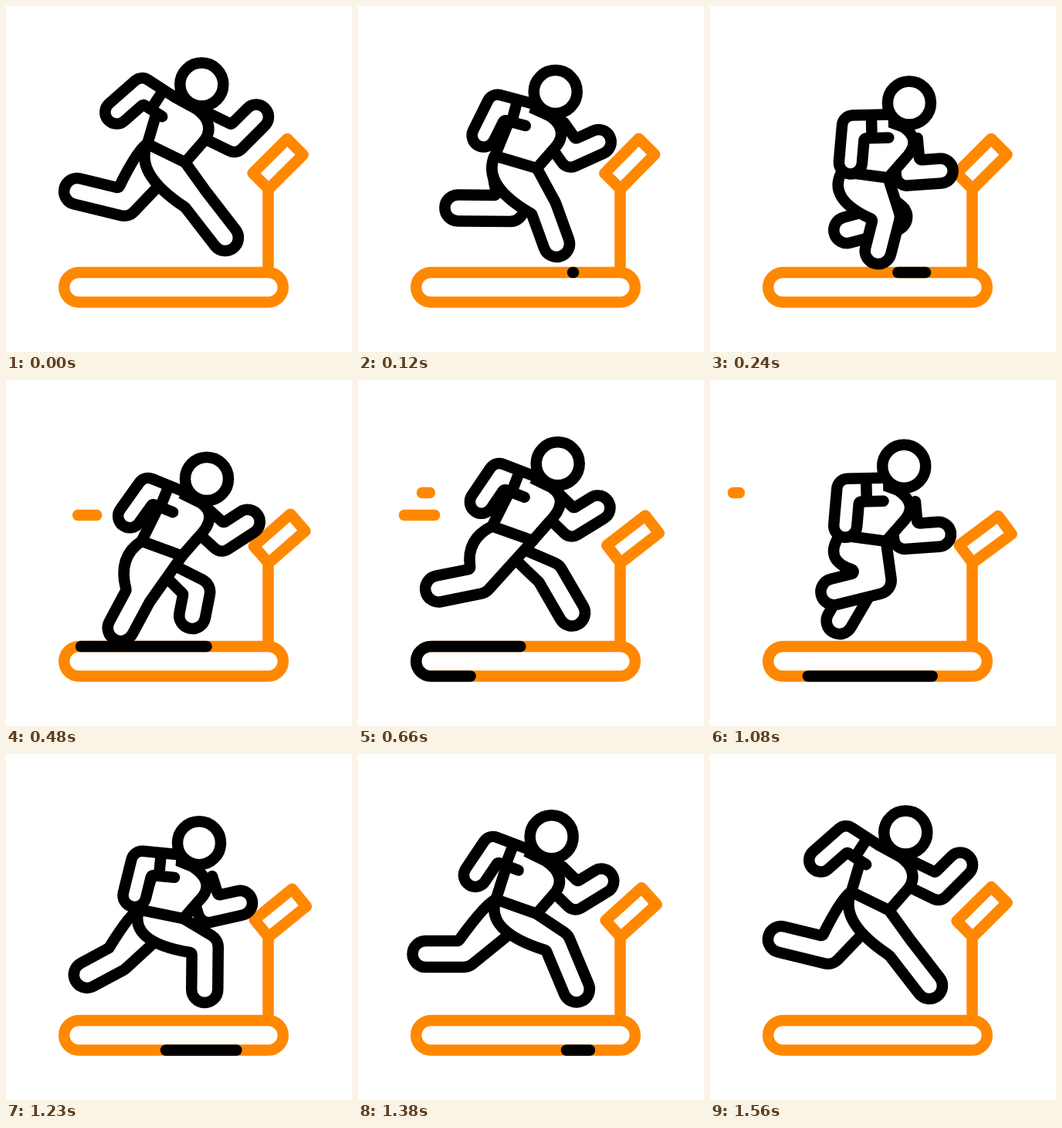
Animation, 448 px wide and 448 px high, one loop 1590 ms. Source, as an HTML page with a canvas:

```html
<!DOCTYPE html>
<html lang="en">
<head>
<meta charset="utf-8">
<title>Treadmill runner</title>
<style>
  html, body { margin: 0; width: 100%; height: 100%; overflow: hidden; background: #fff; }
  canvas { display: block; }
</style>
</head>
<body>
<canvas id="stage" width="448" height="448"></canvas>
<script>
const ctx = document.getElementById('stage').getContext('2d');
const LOOP = 1590, CYCLE = 1560;
const ORANGE = '#ff8800', BLACK = '#000', WHITE = '#fff';

// Stride keys: arm swing, and per leg the knee offset from the belly, foot x, foot y
const strideTimes = [0, 240, 480, 690, 840, 1080, 1230];
const swingKeys = [1, 0, 0.7, 0.65, 0.47, 0, 0.22];
const nearLeg = {
  knee:  [14, -2, -57, -72, -71, -13, 28],
  footX: [284, 218, 149, 99, 91, 160, 257],
  footY: [300, 317, 321, 262, 225, 274, 305]
};
const farLeg = {
  knee:  [-80, 12, 20, 19, -10, -30, -86],
  footX: [92, 177, 241, 278, 239, 168, 105],
  footY: [240, 290, 305, 302, 318, 312, 286]
};

// Smooth cyclic curve through the stride keys
function stride(values, t) {
  const n = values.length;
  const time = i => strideTimes[(i + n) % n] + CYCLE * Math.floor(i / n);
  const value = i => values[(i + n) % n];
  const slope = i => (value(i + 1) - value(i - 1)) / (time(i + 1) - time(i - 1));
  let i = 0;
  while (time(i + 1) <= t) i++;
  const h = time(i + 1) - time(i), u = (t - time(i)) / h, w = 1 - u;
  return w * w * (1 + 2 * u) * value(i) + u * u * (3 - 2 * u) * value(i + 1)
    + h * u * w * (w * slope(i) - u * slope(i + 1));
}

// Cosine of the running phase: harmonic k, shifted by degrees
const wave = (t, degrees = 0, k = 1) => Math.cos(2 * Math.PI * k * t / CYCLE + degrees * Math.PI / 180);
const progress = (t, from, to) => Math.max(0, Math.min(1, (t - from) / (to - from)));
const smooth = u => u * u * (3 - 2 * u);
const mix = (a, b, u) => a + (b - a) * u;

const plus = (a, b, k = 1) => [a[0] + b[0] * k, a[1] + b[1] * k];
const middle = (a, b) => [(a[0] + b[0]) / 2, (a[1] + b[1]) / 2];
const normal = d => [d[1], -d[0]];
function direction(a, b) {
  const x = b[0] - a[0], y = b[1] - a[1], r = Math.hypot(x, y) || 1;
  return [x / r, y / r];
}

function paint(draw, color = BLACK, fill) {
  ctx.beginPath();
  draw();
  if (fill) { ctx.fillStyle = fill; ctx.fill(); }
  ctx.strokeStyle = color;
  ctx.stroke();
}
const segment = (a, b, color) => paint(() => { ctx.moveTo(...a); ctx.lineTo(...b); }, color);

// Two-part limb, open between p and q, bent at joint, round at tip
function limb(p, q, joint, tip, w, bulge) {
  const d1 = direction(middle(p, q), joint), d2 = direction(joint, tip);
  const n1 = normal(d1), n2 = normal(d2);
  const k = w / Math.max(0.45, 1 + n1[0] * n2[0] + n1[1] * n2[1]);
  const miter = plus(n1, n2);
  const bend = d1[0] * d2[1] - d1[1] * d2[0];
  const start = Math.atan2(n2[1], n2[0]);
  paint(() => {
    ctx.moveTo(...p);
    ctx.arcTo(...plus(joint, miter, k), ...plus(tip, n2, w), bend > 0 ? 18 : 3);
    ctx.arc(...tip, w, start, start + Math.PI);
    ctx.arcTo(...plus(joint, miter, -k), ...(bulge || q), bend > 0 ? 3 : 14);
    if (bulge) ctx.quadraticCurveTo(...bulge, ...q);
    else ctx.lineTo(...q);
  }, BLACK, WHITE);
}

function arm(shoulder, elbow, hand, w) {
  const n = normal(direction(shoulder, elbow));
  limb(plus(shoulder, n, w), plus(shoulder, n, -w), elbow, hand, w);
}

function leg(t, keys, belly, front, back, roundness) {
  const reach = stride(keys.knee, t);
  const knee = plus(belly, [reach, 52 - 0.9 * Math.max(0, reach - 10)]);
  const foot = [stride(keys.footX, t), stride(keys.footY, t)];
  const swing = knee[0] - middle(belly, back)[0];
  const bulge = plus(back, [-25 + swing * 0.2, 28 + swing * 0.25], roundness);
  limb(front, back, knee, foot, 17, bulge);
}

function drawTreadmill(t) {
  segment([339.5, 240], [339.5, 345], ORANGE);
  ctx.save();
  ctx.translate(340, 237);
  ctx.rotate(-(40.5 + 5 * wave(t, -30)) * Math.PI / 180);
  paint(() => ctx.rect(0, -29, 63, 29), ORANGE, WHITE);
  ctx.restore();

  const belt = () => {
    ctx.moveTo(279, 345);
    ctx.lineTo(94.5, 345);
    ctx.arc(94.5, 364.25, 19.25, -Math.PI / 2, Math.PI / 2, true);
    ctx.lineTo(339.5, 383.5);
    ctx.arc(339.5, 364.25, 19.25, Math.PI / 2, -Math.PI / 2, true);
    ctx.closePath();
  };
  paint(belt, ORANGE, WHITE);

  const front = 450 * smooth(1 - (1 - progress(t, 100, 1400)) ** 1.65);
  const rear = 450 * smooth(progress(t, 230, 1550) ** 1.25);
  if (front - rear > 0.5) {
    ctx.setLineDash([front - rear, 2000]);
    ctx.lineDashOffset = -rear;
    paint(belt);
    ctx.setLineDash([]);
  }
}

function drawStreak(y, from, to, frontU, rearU) {
  const front = mix(from, to, smooth(frontU)), rear = mix(from, to, smooth(rearU));
  if (rear - front > 0.5) segment([front, y], [rear, y], ORANGE);
}

function drawRunner(t) {
  const swing = stride(swingKeys, t);
  // Offset that goes from relaxed to fully swung
  const swung = (origin, relaxed, full) =>
    plus(origin, [0, 1].map(k => mix(relaxed[k], full[k], swing)));

  const belly = [229 + 3 * wave(t), 211 - 11 * wave(t, -8, 2) + 9.5 * wave(t, -75)];
  const head = [255 + 5 * wave(t, -110), belly[1] - 97 - 4 * swing];
  const back = swung(belly, [-60, -8], [-49, -24]);
  const shoulder = swung(head, [-49, 16], [-50, 8]);

  arm(plus(belly, [22, -50]), swung(belly, [26, -6], [63, -30]), swung(belly, [68, -9], [92, -59]), 16);
  leg(t, farLeg, belly, plus(belly, [-15, 10]), back, 0.3);
  leg(t, nearLeg, belly, belly, back, 1);

  paint(() => {
    ctx.moveTo(...shoulder);
    ctx.lineTo(...plus(head, [-8, 31]));
    ctx.bezierCurveTo(...plus(head, [10, 43]), ...plus(belly, [37, -40]), ...plus(belly, [21, -24]));
    ctx.lineTo(...belly);
    ctx.lineTo(...back);
    ctx.closePath();
  }, BLACK, WHITE);

  const joint = swung(shoulder, [22, 14], [7, 21]);
  const elbow = swung(shoulder, [-23, 15], [-27, -1]);
  arm(joint, elbow, swung(shoulder, [-27, 61], [-60, 28]), 15);
  segment(shoulder, plus(shoulder, normal(direction(joint, elbow)), 27));
  paint(() => ctx.arc(...head, 28, 0, 2 * Math.PI), BLACK, WHITE);
}

function render(now) {
  const t = Math.min(now % LOOP, CYCLE - 0.01);
  ctx.fillStyle = WHITE;
  ctx.fillRect(0, 0, 448, 448);
  ctx.lineWidth = 14.5;
  ctx.lineCap = ctx.lineJoin = 'round';
  drawTreadmill(t);
  drawStreak(175, 118, 60, progress(t, 350, 640), progress(t, 440, 1020));
  drawStreak(146, 100, 30, progress(t, 520, 960), progress(t, 520, 1230));
  drawRunner(t);
}

const begin = performance.now();
function tick() {
  render(performance.now() - begin);
  requestAnimationFrame(tick);
}
tick();
</script>
</body>
</html>
```
